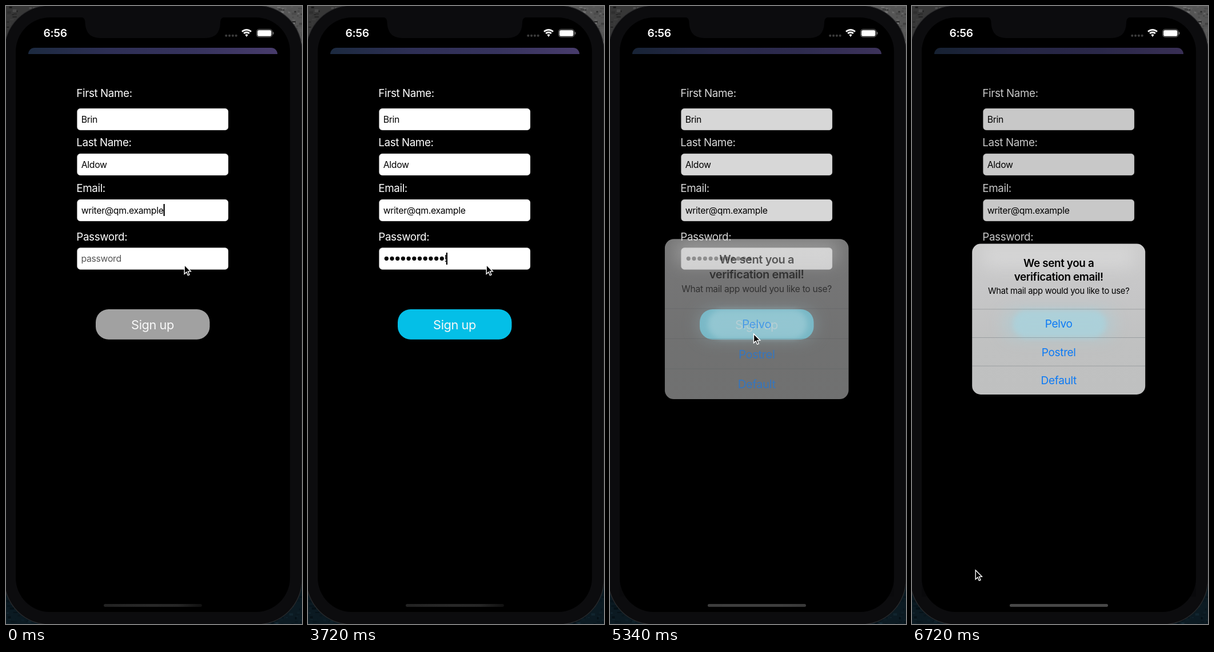
An HTML page with a canvas for the animation above (6780 ms loop, 518x1080 px).

```html
<!DOCTYPE html>
<html lang="en">
<head>
<meta charset="utf-8">
<title>Sign up form</title>
<style>
  html, body { margin: 0; width: 100%; height: 100%; overflow: hidden; background: #000; }
  canvas { display: block; width: 518px; height: 1080px; }
</style>
</head>
<body>
<canvas id="stage" width="518" height="1080"></canvas>
<script>
const ctx = document.getElementById('stage').getContext('2d');
const LOOP = 6780, STEP = 60;
const ALERT_START = 5280;
const CAPS_AT = 720;
const EMAIL = 'writer@qm.example';
const PASSWORD = 'password123!';
const KEY_TIMES = [1740, 1800, 1920, 1980, 2160, 2280, 2400, 2580, 3060, 3240, 3420, 3600];
const MASK_LAST_AT = 4680;
const DOT_PITCH = 9.7, TEXT_X = 132.3;

// Pointer path: time, x, y
const POINTER = [
  [4020, 312.2, 452.5], [4740, 251.5, 573], [5460, 251.5, 573], [5820, 239.8, 652],
  [6060, 238.4, 655], [6600, 239, 655.5], [6660, 200, 757], [6720, 111.2, 986]
];

const clamp01 = v => Math.max(0, Math.min(1, v));
const mix = (a, b, k) => a + (b - a) * k;
const smooth = k => k * k * (3 - 2 * k);

function box(x, y, w, h, r, fill) {
  ctx.beginPath();
  ctx.roundRect(x, y, w, h, r);
  if (fill) { ctx.fillStyle = fill; ctx.fill(); }
}

function disc(x, y, r, fill) {
  ctx.beginPath();
  ctx.arc(x, y, r, 0, Math.PI * 2);
  ctx.fillStyle = fill;
  ctx.fill();
}

function poly(points, fill) {
  ctx.beginPath();
  points.forEach(([x, y]) => ctx.lineTo(x, y));
  ctx.closePath();
  ctx.fillStyle = fill;
  ctx.fill();
}

function outline(color, width) {
  ctx.strokeStyle = color;
  ctx.lineWidth = width;
  ctx.stroke();
}

function setFont(size, weight = 400) {
  ctx.font = `${weight} ${size}px Inter, sans-serif`;
  ctx.letterSpacing = `${-0.02 * size}px`;
}

function text(str, x, y, size, fill, weight = 400, align = 'left') {
  setFont(size, weight);
  ctx.textAlign = align;
  ctx.fillStyle = fill;
  ctx.fillText(str, x, y);
}

function gradient(x0, y0, x1, y1, ...colors) {
  const g = ctx.createLinearGradient(x0, y0, x1, y1);
  colors.forEach((c, i) => g.addColorStop(i / (colors.length - 1), c));
  return g;
}

function seeded(seed) {
  return () => (seed = seed * 16807 % 2147483647) / 2147483647;
}

function drawWallpaper() {
  const rnd = seeded(77);
  const corner = (x, y, tone) => {
    ctx.fillStyle = tone(0.5);
    ctx.fillRect(x, y, 80, 80);
    for (let i = 0; i < 110; i++) {
      ctx.fillStyle = tone(rnd());
      ctx.fillRect(x + rnd() * 80, y + rnd() * 80, 2 + rnd() * 6, 1 + rnd() * 4);
    }
  };
  const grey = (low, high) => v => { const g = mix(low, high, v); return `rgb(${g},${g},${g})`; };
  const teal = v => `rgb(${4 + v * 14},${14 + v * 24},${20 + v * 28})`;
  corner(0, 0, grey(25, 85));
  corner(438, 0, grey(45, 125));
  corner(0, 1000, teal);
  corner(438, 1000, teal);
}

function drawPhone() {
  drawWallpaper();
  box(-3, -1, 521, 1082, 79, '#0c0c0e');
  outline('#2b2b2d', 1.2);
  box(17, 20, 480, 1039, 60, '#000');
}

function drawNotch() {
  ctx.beginPath();
  ctx.moveTo(130, 19);
  ctx.quadraticCurveTo(138.5, 20, 138.5, 28);
  ctx.lineTo(138.5, 30);
  ctx.quadraticCurveTo(140, 56, 165, 56);
  ctx.lineTo(349, 56);
  ctx.quadraticCurveTo(374, 56, 375, 30);
  ctx.lineTo(375, 28);
  ctx.quadraticCurveTo(375, 20, 384, 19);
  ctx.fillStyle = '#0c0c0e';
  ctx.fill();
}

function drawStatus() {
  text('6:56', 65.5, 54, 19.3, '#fff', 600);
  for (let i = 0; i < 4; i++) disc(385.3 + i * 5.8, 51.8, 2.1, '#3b3b3b');

  for (const r of [11.2, 6.8]) {
    ctx.beginPath();
    ctx.arc(421, 52.8, r, -Math.PI * 0.75, -Math.PI * 0.25);
    outline('#fff', 2.8);
  }
  ctx.beginPath();
  ctx.moveTo(421, 54);
  ctx.arc(421, 53, 3.6, -Math.PI * 0.75, -Math.PI * 0.25);
  ctx.fillStyle = '#fff';
  ctx.fill();

  box(438.5, 40.8, 27.4, 13.4, 4.2);
  outline('#777', 1);
  box(440, 42.3, 24.4, 10.4, 2.8, '#fff');
  box(466.8, 45.2, 1.6, 4.6, 1, '#777');
}

function drawHomeBar(bright) {
  box(171, 1045, 172, 5, 2.5, gradient(171, 0, 343, 0, '#222', '#262626', '#282828', '#262626', '#101010'));
  ctx.globalAlpha = bright;
  box(171, 1045, 172, 5, 2.5, '#474747');
  ctx.globalAlpha = 1;
}

// Opacity of a caret whose fade out begins at start.
function blink(t, start) {
  if (t < start) return 1;
  const p = (t - start + STEP) % 1080;
  return p < 480 ? clamp01(1 - p / 180) : clamp01((p - 480) / 180);
}

function drawCaret(x, y, alpha) {
  ctx.globalAlpha = alpha;
  ctx.fillStyle = '#000';
  ctx.fillRect(x, y, 2.2, 21);
  ctx.globalAlpha = 1;
}

function drawCapsIcon() {
  box(360, 431, 21.5, 21, 2, '#b1b1b1');
  poly([[370.8, 433.5], [378, 441], [374, 441], [374, 445.5], [367.6, 445.5], [367.6, 441], [363.6, 441]], '#fff');
  ctx.fillRect(367.6, 447.2, 6.4, 2);
}

function drawPassword(t) {
  const typed = KEY_TIMES.filter(k => k <= t).length;
  if (!typed) {
    text('password', TEXT_X - 0.8, 447, 15.8, '#555');
    if (t >= CAPS_AT) drawCapsIcon();
    if (t >= STEP) drawCaret(TEXT_X, 431, blink(t, 900));
    return;
  }
  const masked = t >= MASK_LAST_AT ? typed : typed - 1;
  for (let i = 0; i < masked; i++) disc(137.3 + i * DOT_PITCH, 441.3, 3.6, '#000');
  let end = TEXT_X + masked * DOT_PITCH;
  if (masked < typed) {
    const letter = PASSWORD[masked];
    text(letter, end - 0.5, 447, 15.8, '#000');
    end += ctx.measureText(letter).width - 0.4;
  }
  if (t < ALERT_START) drawCaret(end - 1, 431, blink(t, 4080));
}

function drawButton(t) {
  box(157, 530, 199.5, 52.7, 22.5, t >= KEY_TIMES[0] ? '#04bfe7' : '#a1a1a1');
  const pressed = smooth(clamp01((t - 4740) / 240)) - clamp01((t - 5100) / 180);
  ctx.globalAlpha = 1 - 0.75 * pressed;
  text('Sign up', 256.5, 564.5, 21.8, '#f8f8f8', 400, 'center');
  ctx.globalAlpha = 1;
}

function drawForm(t) {
  box(39, 73, 436, 11, [11, 11, 0, 0], gradient(39, 0, 475, 0, '#1c2a40', '#2e2f55', '#36335d', '#483c6c'));
  const rows = [
    ['First Name:', 158.5, 179, 'Brin'],
    ['Last Name:', 244.5, 258, 'Aldow'],
    ['Email:', 324.5, 338, EMAIL],
    ['Password:', 410, 422.5, '']
  ];
  for (const [label, labelY, y, value] of rows) {
    text(label, 123.3, labelY, 18.8, '#fff');
    box(124.5, y, 264.5, 38, 5.6, '#fff');
    box(124.8, y + 0.3, 263.9, 37.4, 5.3);
    outline('#ccc', 0.6);
    text(value, 131.7, y + 24.8, 15.8, '#000');
  }
  if (t < STEP) {
    setFont(15.8);
    drawCaret(131.7 + ctx.measureText(EMAIL).width, 346, 1);
  }
  drawPassword(t);
  drawButton(t);
}

function drawAlert(t) {
  const age = t - ALERT_START;
  const scale = 1 + 0.2 * Math.exp(-age / 51);
  ctx.save();
  ctx.globalAlpha = 1 - Math.exp(-age / 68);
  ctx.translate(256.7, 547.3);
  ctx.scale(scale, scale);
  ctx.translate(-256.7, -547.3);

  ctx.save();
  box(105.2, 415.5, 303, 263.5, 15);
  ctx.clip();
  box(105, 415, 304, 265, 0, gradient(0, 415, 0, 679, '#cccccc', '#c6c6c7', '#c0c1c1', '#bfc0c0'));
  ctx.filter = 'blur(14px)';
  box(124, 418, 265, 40, 6, 'rgba(225,225,225,.5)');
  box(160, 530, 194, 52, 24, 'rgba(164,210,222,.45)');
  ctx.filter = 'blur(4px)';
  box(177, 531, 162, 49, 24, 'rgba(170,210,220,.8)');
  ctx.filter = 'none';
  ctx.fillStyle = 'rgba(60,70,75,.28)';
  for (const y of [529.4, 579, 628.6]) ctx.fillRect(105, y, 304, 1);
  ctx.restore();

  const line = (str, y, size, fill, weight) => text(str, 256.7, y, size, fill, weight, 'center');
  line('We sent you a', 455.5, 18.9, '#000', 600);
  line('verification email!', 480, 18.9, '#000', 600);
  line('What mail app would you like to use?', 502.5, 14.8, '#000');
  ['Pelvo', 'Postrel', 'Default'].forEach((name, i) => line(name, 562 + i * 49.7, 19.1, '#0c7af5'));
  ctx.restore();
}

function pointerAt(t) {
  const next = POINTER.findIndex(p => p[0] >= t);
  if (next === 0) return POINTER[0].slice(1);
  const [t0, x0, y0] = POINTER[next - 1], [t1, x1, y1] = POINTER[next];
  const k = smooth((t - t0) / (t1 - t0));
  return [mix(x0, x1, k), mix(y0, y1, k)];
}

function drawPointer(t) {
  ctx.save();
  ctx.translate(...pointerAt(t));
  poly([[0, 0], [0, 15.8], [3.7, 12.4], [6.2, 18.2], [8.8, 17.1], [6.3, 11.5], [11.2, 11.2]], '#000');
  outline('#fff', 1.4);
  ctx.restore();
}

function draw(t) {
  ctx.clearRect(0, 0, 518, 1080);
  drawPhone();
  drawForm(t);
  const shown = t > ALERT_START ? 1 - Math.exp((ALERT_START - t) / 45) : 0;
  if (shown) {
    ctx.fillStyle = `rgba(0,0,0,${0.215 * shown})`;
    ctx.fillRect(17, 72, 480, 960);
    drawAlert(t);
  }
  drawNotch();
  drawStatus();
  drawHomeBar(shown);
  drawPointer(t);
}

const began = performance.now();
function tick() {
  const t = (performance.now() - began) % LOOP;
  draw(Math.floor(t / STEP) * STEP);
  requestAnimationFrame(tick);
}
tick();
</script>
</body>
</html>
```
